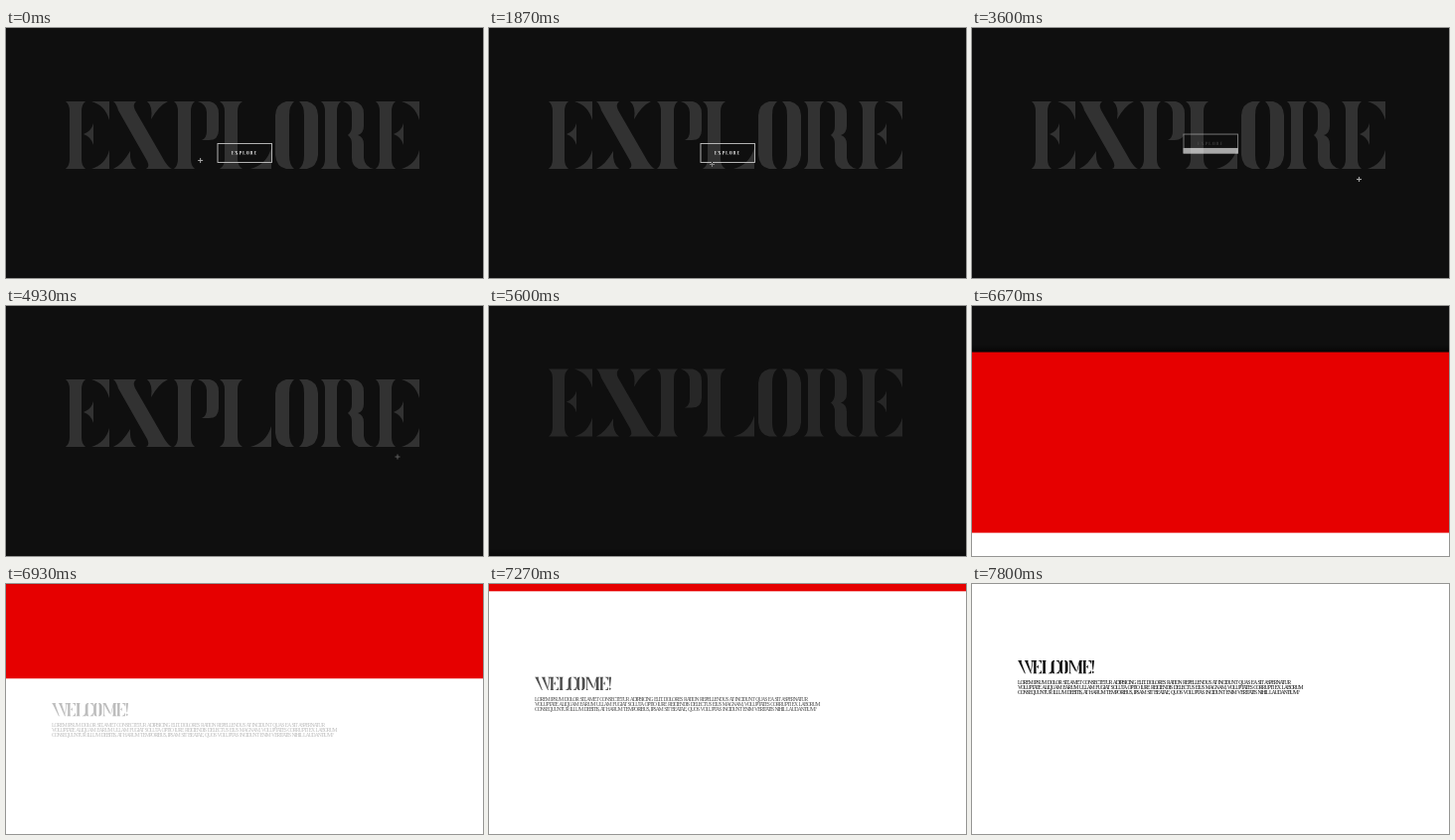
An HTML page that plays this animation: 480x252 px, repeating every 7.87 s.

```html
<!DOCTYPE html>
<html lang="en">
<head>
<meta charset="utf-8">
<title>Explore</title>
<style>
html, body { margin: 0; width: 100%; height: 100%; overflow: hidden; background: #0f0f0f; }
svg { display: block; width: 100vw; height: 100vh; }
.copy { font: 5.6px "Liberation Serif", serif; letter-spacing: -.98px; word-spacing: 1px; }
#cursor { mix-blend-mode: difference; }
</style>
</head>
<body>
<svg viewBox="0 0 480 252">
  <defs>
    <linearGradient id="shade" x2="0" y2="1">
      <stop offset="0" stop-opacity="0"/>
      <stop offset="1" stop-opacity=".6"/>
    </linearGradient>
    <clipPath id="page"><rect id="pageClip" width="480" height="252"/></clipPath>
  </defs>
  <rect width="480" height="252" fill="#0f0f0f"/>
  <g id="title" fill="#323232"></g>
  <g id="button">
    <rect x="213" y="116.5" width="54.5" height="19" fill="none" stroke="#c4c4c4" stroke-width=".9"/>
    <rect id="fill" x="212.600" width="55.300" fill="#fff"/>
    <g id="label"></g>
  </g>
  <path id="cursor" d="M-2.5 0H2.5M0-2.5V2.5" stroke="#bbb"/>
  <rect id="shadow" width="480" height="8" fill="url(#shade)"/>
  <rect id="red" width="480" height="252" fill="#e60000"/>
  <rect id="white" width="480" height="252" fill="#fff"/>
  <g clip-path="url(#page)">
    <g id="text" fill="#0f0f0f">
      <g id="heading"></g>
      <g class="copy">
        <text x="46" y="101">LOREM IPSUM DOLOR SIT, AMET CONSECTETUR ADIPISICING ELIT. DOLORES RATION REPELLENDUS AT INCIDUNT QUAS EA SIT ASPERNATUR</text>
        <text x="46" y="106">VOLUPTATE ALIQUAM EARUM ULLAM FUGIAT SOLUTA OPTIO IURE REICIENDIS DELECTUS EIUS MAGNAM, VOLUPTATES CORRUPTI EX LABORUM</text>
        <text x="46" y="111">CONSEQUUNTUR ILLUM DEBITIS, AT HARUM TEMPORIBUS, IPSAM SIT BEATAE, QUOS VOLUPTAS INCIDUNT ENIM VERITATIS NIHIL LAUDANTIUM?</text>
      </g>
    </g>
  </g>
</svg>
<script>
const LOOP = 7870;
const $ = id => document.getElementById(id);
const set = (id, attrs) => {
  for (const k in attrs) $(id).setAttribute(k, attrs[k]);
};

// Stencil capitals, 68 units tall
const glyphs = {
  E: 'M-1 0H19Q15 3 15 10V58Q15 65 19 68H-1Q3 65 3 58V10Q3 3 -1 0ZM25 0H43V19Q39 4 25 0ZM25 68H43V49Q39 64 25 68ZM17 33Q25 30 27 22V44Q25 36 17 33Z',
  X: 'M1 0H24Q20 3 23 9L53 61Q57 67 60 68H34Q38 66 35 60L6 9Q4 2 1 0ZM35 0H56Q47 4 39 18Q41 5 35 0ZM1 68Q10 64 18 50Q17 63 24 68Z',
  P: 'M3 0H24Q20 3 20 10V58Q20 65 24 68H3Q7 65 7 58V10Q7 3 3 0ZM27 0H39Q48 2 48 12V29Q48 39 38 39H31Q36 37 36 30V11Q36 3 27 0Z',
  L: 'M0 0H23Q18 3 18 10V58Q18 65 23 68H0Q5 65 5 58V10Q5 3 0 0ZM31 68H52V47Q47 64 31 68Z',
  O: 'M20 0H12Q2 2 1 14V54Q2 66 12 68H20Q15 64 15 54V14Q15 4 20 0ZM25 0H33Q43 2 44 14V54Q43 66 33 68H25Q30 64 30 54V14Q30 4 25 0Z',
  R: 'M0 0H20Q16 3 16 10V58Q16 65 20 68H0Q4 65 4 58V10Q4 3 0 0ZM22 0H33Q43 2 43 12V25Q43 32 37 34Q43 36 43 43V57Q44 66 53 68H38Q31 65 31 57V43Q31 37 27 34Q31 31 31 25V11Q31 3 22 0Z',
  W: 'M0 0H21Q17 4 20 12L40 68H36L7 10Q4 3 0 0ZM34 0H55Q51 4 54 12L70 62V68H67L41 10Q38 3 34 0ZM67 0H84Q79 3 77 12L71 58 69 50 74 10Q74 3 67 0Z',
  C: 'M20 0H12Q2 2 1 14V54Q2 66 12 68H20Q15 64 15 54V14Q15 4 20 0ZM24 0H42V20Q37 4 24 0ZM24 68H42V48Q37 64 24 68Z',
  M: 'M0 0H17L40 48 37 58 10 10V58Q10 65 15 68H1Q6 65 6 58V10Q6 3 0 0ZM43 54L56 0H72Q68 4 68 10V58Q68 64 72 68H51Q55 64 55 58V16L44 62Z',
  '!': 'M0 0H13L8 48H5ZM6.500 54L12 61 6.500 68 1 61Z'
};

function letter(id, word, starts, x, y, scale, gap = 0) {
  $(id).innerHTML = [...word].map((c, i) =>
    `<path d="${glyphs[c]}" transform="translate(${x + starts[i] * scale + i * gap} ${y}) scale(${scale})"/>`
  ).join('');
}

const explore = [0, 46, 105, 154, 209, 256, 312];
letter('title', 'EXPLORE', explore, 61, 74, 1);
letter('label', 'EXPLORE', explore, 227, 124.1, .051, 1.15);
letter('heading', 'WELCOME!', [0, 80, 125, 172, 215, 262, 336, 382], 46, 77, .195);

const clamp = v => Math.min(1, Math.max(0, v));
const span = (t, start, length) => clamp((t - start) / length);
const inOut = (p, n) => p < .5 ? 2 ** (n - 1) * p ** n : 1 - 2 ** (n - 1) * (1 - p) ** n;
const expo = p => p <= 0 ? 0 : p >= 1 ? 1 :
  p < .5 ? 2 ** (20 * p - 10) / 2 : 1 - 2 ** (10 - 20 * p) / 2;

// Pointer stops: time, x, y
const stops = [
  [0, 195.5, 133.5], [90, 207, 139], [200, 218, 133], [500, 230, 127], [800, 232, 126],
  [1050, 232, 126], [1200, 222, 138], [1450, 195, 158], [1520, 194, 159],
  [1650, 198, 154], [1800, 214, 143], [1870, 224.5, 137.5], [2050, 232, 128],
  [2300, 234, 126], [2980, 234, 126], [3150, 262, 131], [3400, 355, 149],
  [3600, 389.5, 152.5], [3730, 393, 152.5], [3800, 394, 152], [LOOP, 394, 152]
];

function pointer(t) {
  const i = stops.findIndex(s => s[0] > t);
  const a = stops[i - 1], b = stops[i];
  const p = (t - a[0]) / (b[0] - a[0]);
  return [1, 2].map(k => a[k] + (b[k] - a[k]) * p);
}

function hover(t) {
  const ease = (start, length) => inOut(span(t, start, length), 2);
  return ease(60, 810) - ease(1060, 740) + ease(1840, 890) - ease(3100, 800);
}

function render(t) {
  const [x, y] = pointer(t);
  set('cursor', {
    transform: `translate(${x} ${y})`,
    opacity: t < 4930 ? 1 : t < 5000 ? .5 : 0
  });

  const h = clamp(hover(t));
  set('fill', { y: 136 - 20 * h, height: 20 * h });
  const tone = Math.round(255 - 240 * clamp(h * 2.5));
  set('label', { fill: `rgb(${tone},${tone},${tone})` });
  const leave = span(t, 3150, 1250);
  set('button', {
    transform: `translate(0 ${-16 * (1 - (1 - leave) ** 2)})`,
    opacity: 1 - leave
  });

  const d = Math.max(0, t - 5200);
  set('title', {
    transform: `translate(0 ${-6.6e-5 * d * d})`,
    opacity: 1 - clamp(d / 1300)
  });

  const red = 252 * (1 - inOut(span(t, 6142, 825), 3));
  set('red', { y: red });
  set('shadow', { y: red - 8, opacity: span(t, 5200, 700) });

  const edge = 252 * (1 - expo(span(t, 5976, 1836)));
  const white = edge < 1 ? 0 : edge;
  set('white', { y: white });
  set('pageClip', { y: white });

  const rest = Math.max(0, 7841 - t) / 911;
  set('text', {
    transform: `translate(0 ${43 * rest * rest})`,
    opacity: span(t, 6730, 740)
  });
}

const begin = performance.now();
function tick() {
  render((performance.now() - begin) % LOOP);
  requestAnimationFrame(tick);
}
tick();
</script>
</body>
</html>
```
